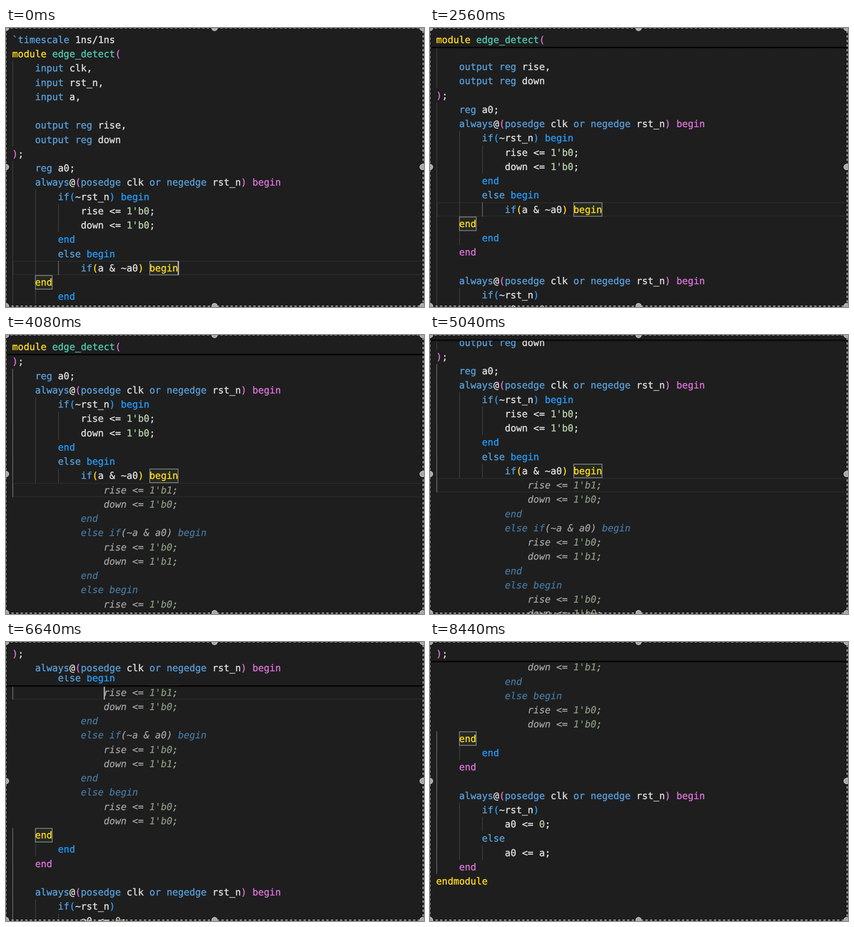
These frames come from a looping animation (916x611 px, 8920 ms). An HTML page:

```html
<!DOCTYPE html>
<html lang="en">
<head>
<meta charset="utf-8">
<title>Code editor</title>
<style>
html, body { margin: 0; width: 100%; height: 100%; overflow: hidden; background: #1e1e1e; }
svg { display: block; width: 916px; height: 611px; }
text { font-family: "DejaVu Sans Mono", "Liberation Mono", monospace; font-size: 20.82px; color: #dcdcdc;
  white-space: pre; text-rendering: geometricPrecision; }
text, tspan { fill: currentColor; stroke: currentColor; stroke-width: .5px; }
.k { color: #569cd6; } .t { color: #4ec9b0; } .n { color: #b5cea8; }
.y { color: #fdd71c; } .p { color: #da70d6; } .b { color: #2299f5; }
.ghost { opacity: .7; }
.ghost text { font-style: italic; }
.ghost text, .ghost tspan { stroke-width: .35px; }
.box { fill: #242a22; stroke: #8c8c8c; stroke-width: 1.6; }
</style>
</head>
<body>
<svg viewBox="0 0 916 611">
  <defs>
    <linearGradient id="shade" x2="0" y2="1">
      <stop offset="0" stop-color="#000"/>
      <stop offset="1" stop-color="#000" stop-opacity="0"/>
    </linearGradient>
    <linearGradient id="edge" x2="0" y2="1">
      <stop offset=".5" stop-color="#000"/>
      <stop offset="1" stop-color="#000" stop-opacity="0"/>
    </linearGradient>
    <clipPath id="view"><rect y="9.9" width="916" height="602"/></clipPath>
  </defs>
  <rect width="916" height="611" fill="#1e1e1e"/>
  <g id="editor" clip-path="url(#view)"></g>
  <g id="frame"></g>
</svg>
<script>
const LOOP = 8920, ROW = 31.25, TOP = 9.9, LEFT = 13.6, COL = 12.53, BASE = 22.9;
const ENTER = 3440, SUGGEST = 3760, FLICK = 5008;

const always = "    {kalways}@{p(}{kposedge} clk {kor} {knegedge} rst_n{p)} {pbegin}";
const set = (name, bit) => `${name} <= {n1'b${bit}};`;
const pair = (indent, rise, down) => [indent + set("rise", rise), indent + set("down", down)];
const pad = n => " ".repeat(n);

const headLines = [
  "{k`timescale} 1ns/1ns",
  "{ymodule} {tedge_detect}{p(}",
  "    {kinput} clk,",
  "    {kinput} rst_n,",
  "    {kinput} a,",
  "",
  "    {koutput} {kreg} rise,",
  "    {koutput} {kreg} down",
  "{p)};",
  "    {kreg} a0;",
  always,
  "        {kif}{b(}~rst_n{b)} {bbegin}",
  ...pair(pad(12), 0, 0),
  "        {bend}",
  "        {kelse} {bbegin}",
  "            {kif}{y(}a & ~a0{y)} {ybegin}"
];
const tailLines = [
  "    {yend}",
  "        {bend}",
  "    {pend}",
  "",
  always,
  "        {kif}{b(}~rst_n{b)}",
  "            a0 <= {n0};",
  "        {kelse}",
  "            a0 <= a;",
  "    {pend}",
  "{yendmodule}"
];
const ghostLines = [
  ...pair(pad(16), 1, 0),
  "            {kend}",
  "            {kelse} {kif}(~a & a0) {kbegin}",
  ...pair(pad(16), 0, 1),
  "            {kend}",
  "            {kelse} {kbegin}",
  ...pair(pad(16), 0, 0)
];

function add(parent, tag, attrs = {}) {
  const el = document.createElementNS("http://www.w3.org/2000/svg", tag);
  for (const name in attrs) el.setAttribute(name, attrs[name]);
  parent.appendChild(el);
  return el;
}
const put = (el, attrs) => { for (const name in attrs) el.setAttribute(name, attrs[name]); };
const show = (el, on) => el.setAttribute("visibility", on ? "visible" : "hidden");
const rowY = row => TOP + row * ROW;
const colX = col => LEFT + col * COL;

function addLine(parent, line, y) {
  const code = line.trimStart();
  if (!code) return;
  const text = add(parent, "text", { x: colX(line.length - code.length), y: y + BASE });
  for (const [, color, word, plain] of code.matchAll(/\{(.)(.*?)\}|([^{]+)/g)) {
    add(text, "tspan", color ? { class: color } : {}).textContent = word || plain;
  }
}
function addGuide(parent, col, first, last) {
  return add(parent, "rect", { x: colX(col) + .3, y: rowY(first), width: 1.5, height: (last - first + 1) * ROW, fill: "#404040" });
}
function addBox(parent, col, length, row) {
  add(parent, "rect", { class: "box", x: colX(col) + .8, y: rowY(row) + .9, width: length * COL - .8, height: ROW - 1.4 });
}

const editor = document.getElementById("editor");
const page = add(editor, "g");
const current = add(page, "rect", { x: 16, width: 904, height: ROW - 2, fill: "none", stroke: "#2a2a2a", "stroke-width": 2 });
const head = add(page, "g"), tail = add(page, "g"), ghost = add(page, "g", { class: "ghost" });

addGuide(head, 0, 2, 7);
addGuide(head, 4, 11, 16);
addGuide(head, 8, 12, 13);
const innerGuide = addGuide(head, 8, 16, 16);
const outerGuides = [addGuide(head, 0, 9, 16), addGuide(tail, 0, 17, 26)];
const blankGuide = addGuide(page, 0, 17, 17);
addGuide(tail, 4, 18, 18);
addGuide(tail, 4, 22, 25);
addGuide(tail, 8, 23, 23);
addGuide(tail, 8, 25, 25);
addBox(head, 24, 5, 16);
addBox(tail, 4, 3, 17);
headLines.forEach((line, i) => addLine(head, line, rowY(i)));
tailLines.forEach((line, i) => addLine(tail, line, rowY(17 + i)));
ghostLines.forEach((line, i) => addLine(ghost, line, rowY(17 + i)));
const cursor = add(page, "rect", { width: 2.8, height: ROW, fill: "#aeafad" });

const topShade = add(editor, "rect", { y: TOP, width: 916, height: 5, fill: "url(#shade)" });
const pinShade = add(editor, "rect", { width: 916, height: 4, fill: "url(#edge)" });

// Pinned scope headers, deepest first so that outer ones cover them.
const pins = [
  { start: 11, end: 13, depth: 2 },
  { start: 15, end: 16, depth: 2 },
  { start: 10, end: 16, depth: 1 },
  { start: 8, end: 36, depth: 0 },
  { start: 1, end: 7, depth: 0, until: FLICK }
];
for (const pin of pins) {
  pin.el = add(editor, "g");
  add(pin.el, "rect", { width: 916, height: ROW, fill: "#1e1e1e" });
  addLine(pin.el, headLines[pin.start], 0);
}

// Selection border with its handles.
const frame = document.getElementById("frame");
add(frame, "rect", { x: 0, y: 0, width: 914, height: 609, fill: "none", stroke: "#b8b8b8", "stroke-width": 2, "stroke-dasharray": "5 5" });
for (const x of [0, 457, 913]) for (const y of [0, 304.5, 609]) {
  if (x === 457 && y === 304.5) continue;
  add(frame, "circle", { cx: x, cy: y, r: 6, fill: "#a8a8a8", stroke: "#c4c4c4", "stroke-width": 1.5 });
}

function ease(t, start, length, power) {
  const p = Math.min(1, Math.max(0, (t - start) / length));
  return 1 - Math.pow(1 - p, power);
}
function scrollAt(t) {
  return 217.3 * ease(t, 2080, 1073, 1.5)
    + 229 * ease(t, FLICK, 1400, 2)
    + 211.7 * ease(t, 6680, 1120, 2);
}
function blink(since) {
  if (since < 460) return 1;
  const p = since % 960;
  return p < 460 ? Math.min(1, p / 80) : Math.max(0, 1 - (p - 460) / 80);
}

function render(t) {
  const scroll = scrollAt(t), entered = t >= ENTER, suggested = t >= SUGGEST;
  const shift = suggested ? 10 : entered ? 1 : 0;
  const row = entered ? 17 : 16;

  put(page, { transform: `translate(0 ${-scroll})` });
  put(tail, { transform: `translate(0 ${shift * ROW})` });
  show(ghost, suggested);
  show(blankGuide, entered);
  put(current, { y: rowY(row) + 1 });
  put(innerGuide, { fill: entered ? "#404040" : "#707070" });
  for (const guide of [...outerGuides, blankGuide]) put(guide, { fill: entered ? "#707070" : "#404040" });
  put(cursor, {
    x: entered ? colX(16) : colX(29) - .6,
    y: rowY(row),
    opacity: blink(entered ? t - ENTER : t - 15)
  });

  let bottom = 0;
  for (const { start, end, depth, until = LOOP, el } of pins) {
    const slot = depth * ROW, endY = (end + 1) * ROW - scroll;
    const on = t < until && start * ROW - scroll < slot && endY > slot;
    show(el, on);
    if (!on) continue;
    const y = Math.min(slot, endY - ROW);
    put(el, { transform: `translate(0 ${TOP + y})` });
    bottom = Math.max(bottom, y + ROW);
  }
  show(pinShade, bottom > 0);
  put(pinShade, { y: TOP + bottom });
  show(topShade, scroll > 0);
}

const begin = performance.now();
function tick() {
  render((performance.now() - begin) % LOOP);
  requestAnimationFrame(tick);
}
tick();
</script>
</body>
</html>
```
